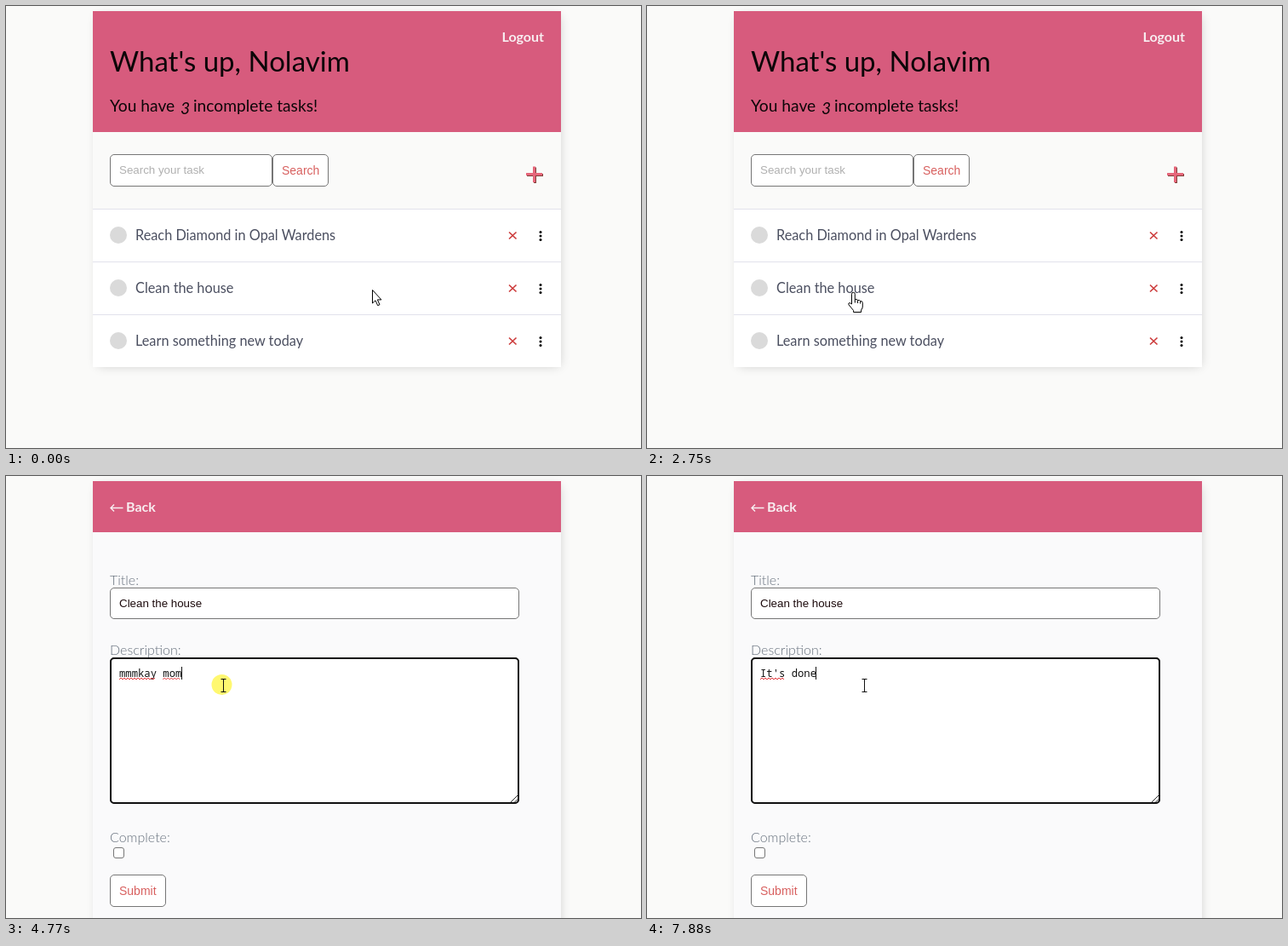
An HTML page for the animation above (8 s loop, 746x519 px).

```html
<!DOCTYPE html>
<html lang="en">
<head>
<meta charset="utf-8">
<title>To-do list</title>
<style>
html, body { margin: 0; width: 100%; height: 100%; overflow: hidden; background: #fafaf9; }
svg { display: block; width: 746px; height: 519px; }
text { font: 16.3px Lato, sans-serif; fill: #4b4f60; white-space: pre; }
.head { fill: #d75b7d; }
.shadow { filter: blur(6.5px); opacity: .21; }
.box { fill: #fff; stroke: #767676; }
.h1 { font-size: 33px; fill: #0c0608; }
.h2 { font-size: 19.2px; fill: #0c0608; }
.nav { font-size: 16px; font-weight: 700; fill: #f8eef1; }
.label { font-size: 16px; font-weight: 300; fill: #66707c; }
.field { font: 13.33px "Liberation Sans", Arial, sans-serif; fill: #1c0a0c; }
.hint { fill: #b0b0b0; }
.button { font: 14px "Liberation Sans", Arial, sans-serif; fill: #d8605f; }
.mono { font: 12.22px "Noto Sans Mono", monospace; fill: #111; }
.line { fill: none; stroke: #111; }
.cursor { fill: #fff; stroke: #000; stroke-linejoin: round; }
</style>
</head>
<body>
<svg viewBox="0 0 746 519">
  <g id="list">
    <rect class="shadow" x="108" y="12" width="542" height="410"/>
    <rect x="102" y="6" width="550" height="418" fill="#fafaf9"/>
    <rect class="head" x="102" y="6" width="550" height="142"/>
    <text class="nav" x="632" y="42" text-anchor="end">Logout</text>
    <text class="h1" x="122" y="77">What's up, Nolavim</text>
    <text class="h2" x="122" y="124">You have</text>
    <text class="h2" x="205" y="127" font-style="italic" style="font-style:italic">3</text>
    <text class="h2" x="220" y="124">incomplete tasks!</text>
    <rect class="box" x="122.5" y="174.5" width="190" height="37" rx="4.5"/>
    <text class="field hint" x="133" y="197">Search your task</text>
    <rect class="box" x="313.5" y="174.5" width="65" height="37" rx="4.5"/>
    <text class="button" x="324" y="198">Search</text>
    <path id="plus" d="M619 188.5h3v7.5h8v3h-8v8h-3v-8h-8v-3h8z" fill="#e5667a"
      style="filter:drop-shadow(1px 1px .5px #81413b)"/>
    <g id="rows"></g>
  </g>
  <g id="form">
    <rect class="shadow" x="108" y="12" width="542" height="540"/>
    <rect x="102" y="6" width="550" height="540" fill="#fafafb"/>
    <rect class="head" x="102" y="6" width="550" height="60"/>
    <path d="M137.5 37.5H123M127 33.5L123 37.5L127 41.5" fill="none" stroke="#f8eef1" stroke-width="1.4"/>
    <text class="nav" x="141" y="42">Back</text>
    <text class="label" x="122" y="128">Title:</text>
    <rect class="box" x="122.5" y="131.5" width="480" height="36" rx="4.5"/>
    <text class="field" x="133" y="154">Clean the house</text>
    <text class="label" x="122" y="210">Description:</text>
    <rect class="box" x="122.5" y="213.5" width="480" height="171" rx="4.5"/>
    <rect id="focus" x="123" y="214" width="479" height="170" rx="4" fill="none" stroke="#101010" stroke-width="2"/>
    <path class="line" d="M593 383L601 375M597.5 383L601 379.5" stroke-width=".9"/>
    <rect id="selection" x="133" y="224" width="74" height="15" fill="#0078d7"/>
    <text id="note" class="mono" x="133" y="236"></text>
    <path id="squiggle" fill="none" stroke="#e0383c"/>
    <path id="caret" class="line" d="M.5 224V239"/>
    <text class="label" x="122" y="430">Complete:</text>
    <rect class="box" x="126.5" y="436.5" width="12" height="12" rx="2.5"/>
    <rect class="box" x="122.5" y="468.5" width="65" height="37" rx="4.5"/>
    <text class="button" x="133" y="492">Submit</text>
  </g>
  <circle id="halo" r="12" fill="#fff200" fill-opacity=".56"/>
  <path id="arrow" class="cursor" d="M.5 .5V16L4 12.8L6.7 18.7L9 17.7L6.4 11.9H11z"/>
  <g id="hand" class="cursor">
    <path d="M-1.5 14V2.2a1.9 1.9 0 0 1 3.8 0V8.5q3-.8 3.3 1q2.6-.6 3 1q2.6-.2 2.7 2V17q0 2-1.7 4V23.5H.6V21.5L-5 14.8q-.8-2.4 1.3-2.2z"/>
    <path d="M2.3 8.5v4M5.6 9.5v3.5M8.6 10.5v3" fill="none"/>
  </g>
  <path id="beam" class="line" d="M-2.5 -7.5H3.5M.5 -7.5V7.5M-2.5 7.5H3.5"/>
</svg>
<script>
const LOOP = 8000, CHAR = 7.33, LEFT = 133;
const OPEN = 2880, FOCUS = 4770, SELECT = 5100, TYPE = 5700;
const $ = id => document.getElementById(id);
const show = (id, on) => $(id).style.display = on ? '' : 'none';
const place = (id, x, y) => $(id).setAttribute('transform', `translate(${x} ${y})`);
const between = (t, a, b) => t >= a && t < b;

// [time, x, y] of the pointer's hot spot
const roam = [
  [463, 430, 333], [530, 440, 328], [663, 486, 292], [796, 460, 264],
  [930, 380, 257], [1063, 300, 268], [1196, 264, 298], [1329, 260, 322],
  [1396, 264, 332], [1529, 292, 350], [1662, 310, 352], [1795, 306, 348],
  [1928, 285, 347], [2062, 262, 343], [2195, 243, 336], [2261, 242, 336]
];
const climb = [[3434, 242, 336], [3500, 244, 322], [3697, 250, 246], [3763, 252, 229], [3959, 255, 246]];

const typed = [
  [0, 'mmmkay mom'], [TYPE, 'I'], [6030, 'It'], [6360, "It'"], [6620, "It's"],
  [6750, "It's "], [6880, "It's d"], [7610, "It's do"], [7810, "It's don"], [7880, "It's done"]
];

$('rows').innerHTML = ['Reach Diamond in Opal Wardens', 'Clean the house', 'Learn something new today']
  .map((title, i) => `<g transform="translate(0 ${238 + 62 * i})">
    <rect x="102" width="550" height="62" fill="#fff"/>
    <rect x="102" width="550" height="1" fill="#e2e2ec"/>
    <circle cx="132" cy="31" r="10" fill="#dadada"/>
    <text x="152" y="37">${title}</text>
    <path d="M591 27.5L599.5 35.5M599.5 27.5L591 35.5" stroke="#cd3d3d" stroke-width="1.7"/>
    ${[27.5, 32, 36.5].map(y => `<circle cx="628" cy="${y}" r="1.5"/>`).join('')}
  </g>`).join('');

function along(path, t, tick) {
  const start = path[1][0];
  const now = t < start ? 0 : start + Math.floor((t - start) / tick) * tick;
  if (now <= path[0][0]) return path[0].slice(1);
  const i = path.findIndex(p => p[0] > now);
  if (i < 0) return path[path.length - 1].slice(1);
  const [t0, x0, y0] = path[i - 1], [t1, x1, y1] = path[i];
  const k = (now - t0) / (t1 - t0);
  return [Math.round(x0 + (x1 - x0) * k), Math.round(y0 + (y1 - y0) * k)];
}

const overLink = (x, y) =>
  between(x, 152, 382) && between(y, 259, 282) || between(x, 152, 266) && between(y, 321, 344);

function wave(from, to) {
  let d = '';
  for (let i = from * CHAR, up = 0; i <= to * CHAR; i += 2, up ^= 1)
    d += `${d ? 'L' : 'M'}${LEFT + i} ${up ? 237 : 239}`;
  return d;
}

function drawPointer(t) {
  const rising = t >= 3500;
  const [x, y] = rising ? along(climb, t, 65.6) : along(roam, t, 66.6);
  const kind = rising ? 'beam' : t >= OPEN || overLink(x, y) ? 'hand' : 'arrow';
  for (const id of ['arrow', 'hand', 'beam']) show(id, id === kind);
  place(kind, x, y);
  show('halo', between(t, 2600, 2750) || between(t, FOCUS, 4900));
  place('halo', t < OPEN ? 242 : 253.5, t < OPEN ? 336 : 245);
}

function drawNote(t) {
  const note = typed.filter(s => s[0] <= t).pop()[1];
  const selected = between(t, SELECT, TYPE);
  $('note').textContent = note;
  $('note').style.fill = selected ? '#fff' : '';
  show('selection', selected);
  show('focus', t >= FOCUS);
  show('caret', between(t, FOCUS, SELECT) || between(t, TYPE, 7410) || t >= 7610);
  place('caret', Math.floor(LEFT + note.length * CHAR), 0);
  const misspelt = between(t, FOCUS, TYPE) ? wave(0, 6) + wave(7, 10) : t >= 6750 ? wave(0, 4) : '';
  $('squiggle').setAttribute('d', misspelt);
}

const begin = performance.now();
function draw() {
  const t = (performance.now() - begin) % LOOP;
  show('list', t < OPEN);
  show('form', t >= OPEN);
  drawPointer(t);
  drawNote(t);
  requestAnimationFrame(draw);
}
draw();
</script>
</body>
</html>
```
